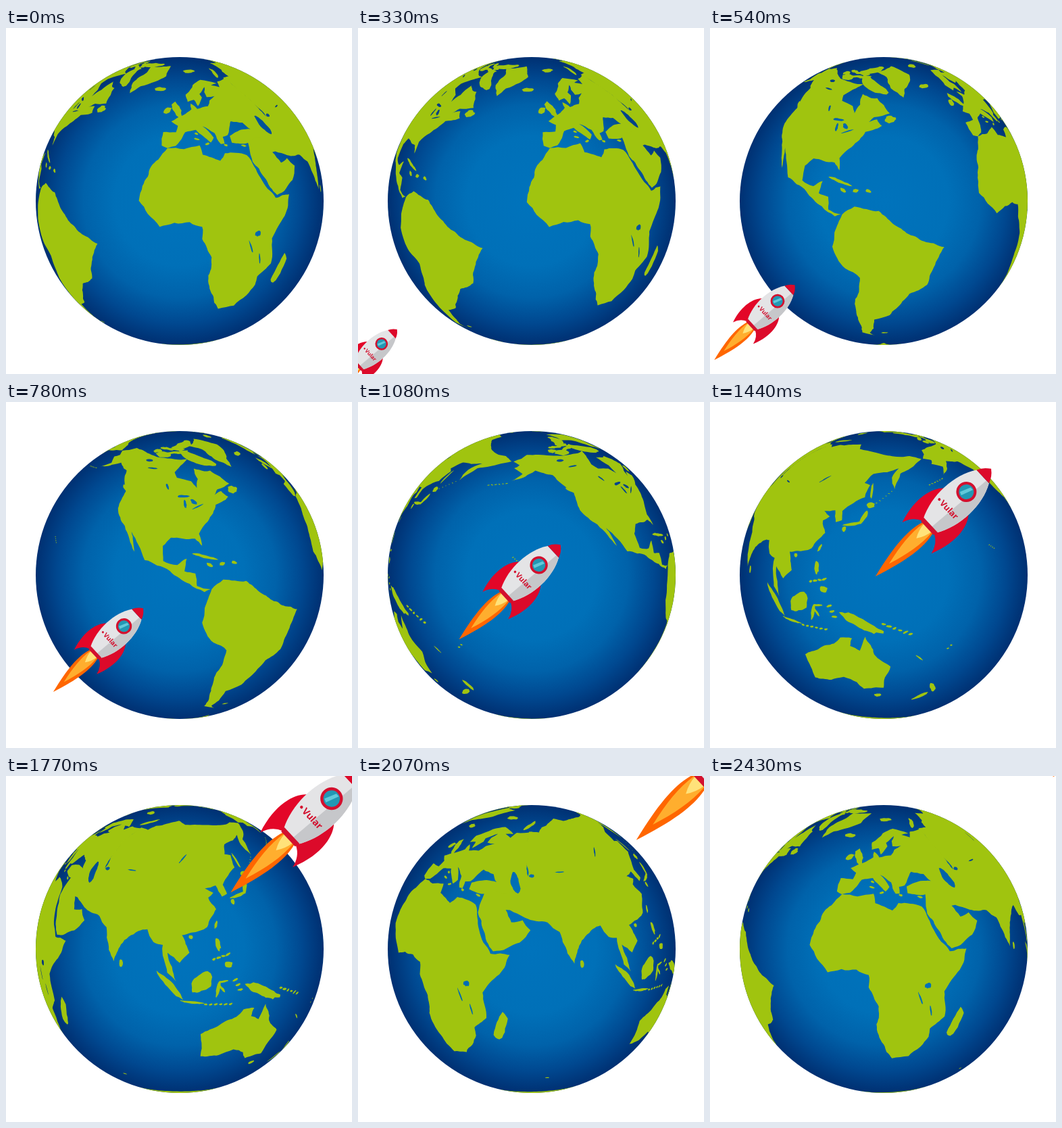
Animation of 512 by 512 pixels, one loop 2.53 s. Source, as an HTML page with a canvas:

```html
<!DOCTYPE html>
<html lang="en">
<head>
<meta charset="utf-8">
<title>Rocket around the globe</title>
<style>
  html, body { margin: 0; width: 100%; height: 100%; overflow: hidden; background: #fff; }
  canvas { display: block; width: 512px; height: 512px; }
</style>
</head>
<body>
<canvas id="stage" width="512" height="512"></canvas>
<script>
const ctx = document.getElementById('stage').getContext('2d');
const LOOP = 2530, STEP = 30, RAD = Math.PI / 180;
const CX = 257, CY = 256, R = 213, TILT = 14.5 * RAD;
const GREEN = '#a0c40f', RED = '#d3102e';
const lands = [], lakes = [];

let seed = 7;
function random() {
  seed = (seed * 16807) % 2147483647;
  return seed / 2147483647;
}

// Splits an edge by midpoint displacement, which gives a ragged shore.
function roughen([x0, y0], [x1, y1], out) {
  const mx = (x0 + x1) / 2, my = (y0 + y1) / 2, cos = Math.cos(my * RAD);
  const dx = (x1 - x0) * cos, dy = y1 - y0;
  if (Math.hypot(dx, dy) < 1.8) return out.push([x0, y0]);
  const shift = (random() - .5) * .14;
  const mid = [mx - dy * shift / cos, my + dx * shift];
  roughen([x0, y0], mid, out);
  roughen(mid, [x1, y1], out);
}

function addShape(list, corners) {
  const out = [];
  corners.forEach((p, i) => roughen(p, corners[(i + 1) % corners.length], out));
  list.push(out.map(([lon, lat]) =>
    ({ lon: lon * RAD, s: Math.sin(lat * RAD), c: Math.cos(lat * RAD) })));
}

// Closed shore through lon, lat pairs
function coast(...c) {
  addShape(lands, Array.from({ length: c.length / 2 }, (_, i) => [c[2 * i], c[2 * i + 1]]));
}

// Uneven ellipse: half length a, half width b, turned by rot degrees from east
function blob(list, lon, lat, a, b, rot = 0) {
  const cr = Math.cos(rot * RAD), sr = Math.sin(rot * RAD), n = 14;
  addShape(list, Array.from({ length: n }, (_, i) => {
    const w = i / n * 2 * Math.PI, k = .85 + .35 * random();
    const x = a * k * Math.cos(w), y = b * k * Math.sin(w);
    return [lon + (x * cr - y * sr) / Math.cos(lat * RAD), lat + x * sr + y * cr];
  }));
}
const isle = (...p) => blob(lands, ...p);
const lake = (...p) => blob(lakes, ...p);

function chain(x0, y0, x1, y1, n, size) {
  for (let i = 0; i < n; i++) {
    const k = i / (n - 1);
    isle(x0 + (x1 - x0) * k, y0 + (y1 - y0) * k, size * (.8 + .6 * random()), size * .5, 60 * random() - 30);
  }
}

// Africa
coast(-6,36, 10,37, 11,33, 19,30, 22,33, 33,31, 37,21, 43,12, 51,12, 47,4, 40,-4, 41,-15, 35,-20, 35,-24,
  32,-29, 27,-34, 19,-35, 15,-27, 12,-17, 13,-9, 9,-1, 9,4, 4,6, -8,4, -13,9, -17,14, -16,20, -13,28, -10,31);
// Europe and Anatolia
coast(-6,36, -9,37, -9,43, -2,43, -1,46, -5,48, 2,51, 8,54, 8,57, 12,54, 20,55, 23,58, 29,60, 22,60, 22,63,
  25,66, 17,62, 18,60, 13,55.5, 11,59, 6,58, 5,62, 14,68, 26,71, 41,67, 33,66.5, 40,64.5, 44,68, 60,69,
  60,36, 36,36, 27,37, 27,40, 30,41, 35,42, 41,41.5, 38,45, 31,46.5, 28,43, 26,40.5, 23,40, 23,37, 21,37,
  19,42, 13,45.5, 18,40, 16,38, 9,44, 3,43, 0,39, -2,37);
// Asia
coast(35,31, 35,28, 39,21, 44,13, 55,17, 59.5,22, 56,26, 51,25, 48,30, 50,30, 57,27, 67,25, 72,21, 73,17,
  77.5,8, 80,15, 87,21, 91,22, 94,17, 98,16, 100,5, 103.5,1.5, 100,13, 105,9, 109,13, 106,20, 110,21, 117,23,
  122,30, 119,35, 122,37, 118,39, 124,40, 126,35, 129,36, 128,40, 139,47, 141,53, 137,54, 142,59, 163,62,
  156,57, 157,51, 163,59, 178,63, 190,66, 180,69, 160,70, 140,72.5, 113,74, 104,77.5, 80,73, 73,72, 68,68.5,
  57,69, 57,39, 36,37);
// North America
coast(-168,66, -156,71, -128,70, -95,68, -82,68, -87,65, -94,60, -92,57, -82,55, -79,51.5, -77,56, -78,62,
  -70,60, -65,60, -56,52, -66,50, -70,47, -64,49, -61,46, -66,44, -70,43, -76,36, -81,31, -80,26, -83,29,
  -94,29.5, -97.5,26, -97,20, -91,18.5, -87,21, -88,16, -83.5,15, -83,10, -77.5,8.5, -80,7.5, -86,11, -94,16,
  -105,20, -113,31, -110,23, -117,33, -124,40, -124,48, -134,58, -147,61, -152,59, -164,55, -157,59,
  -165,62, -161,64);
// South America
coast(-77,8.5, -72,12, -62,10.5, -50,1, -35,-5.5, -39,-14, -41,-22, -48.5,-26, -54,-34, -57,-38, -65,-41,
  -66,-48, -69,-52, -65.5,-55, -74,-52, -73.5,-40, -70,-18, -76,-14, -81,-5, -80,1);
// Australia
coast(142.5,-11, 146,-19, 153,-25, 150,-37, 140,-38, 137,-34, 131,-31.5, 124,-34, 115,-34, 114,-22, 122,-18,
  129,-15, 132,-12, 137,-12, 136,-15.5, 140,-17.5);
// Greenland
coast(-73,78, -33,83.5, -20,74, -40,65, -44,60, -53,66, -56,74);
// Antarctica: a wavy ring with one peninsula
addShape(lands, Array.from({ length: 72 }, (_, i) => {
  const lon = i * 5 - 180;
  return [lon, -71 + 4 * Math.cos((lon - 100) * RAD) + 9 * Math.exp(-(((lon + 60) / 6) ** 2))];
}).concat([[180, -85], [-180, -85]]));

// Northern islands
isle(-73, 68, 8, 2.6, -45);
isle(-80, 79.5, 5, 2.4, 45);
isle(-110, 71, 3, 2);
isle(-121, 73, 1.7, 1.4);
chain(-115, 75.5, -88, 75.3, 5, 1.6);
chain(-100, 72.5, -86, 73, 3, 1.8);
isle(-56, 49, 2.2, 1.7);
isle(-18.5, 65, 2.4, 1.2);
isle(-2, 54, 4.2, 1.4, 110);
isle(-8, 53.3, 1.8, 1.2, 60);
isle(18, 78.5, 2.2, 1.4);
isle(58, 73.5, 4.5, .8, 55);
// Mediterranean, Caribbean and Atlantic
chain(9, 42.2, 9, 39.8, 2, .9);
chain(14, 37.5, 33, 35.1, 3, .9);
isle(-79.5, 21.7, 5, .6, -17);
chain(-77.3, 18.2, -66.5, 18.4, 3, 1.3);
isle(-59.5, -51.7, 1.3, .5);
// Indian Ocean and Indonesia
isle(46.8, -18.7, 6.8, 2, 72);
isle(80.7, 7.6, 1.4, .8, 90);
isle(69.5, -49.2, .8, .4);
isle(101, -.2, 7, 1.2, -48);
isle(110, -7.3, 4.4, .5, -8);
isle(114, .9, 4.8, 3.3, 45);
isle(120.5, -2.2, 3.2, .7, 80);
isle(122.7, .8, 2.2, .4, 5);
isle(122, -2, 2, .5, -50);
chain(115.5, -8.4, 126, -9, 6, .8);
chain(127.8, 1, 130, -3.3, 3, .9);
isle(141, -5.4, 9, 2, -25);
chain(150, -5.5, 161, -10, 6, .9);
// Pacific
isle(121, 16, 2.6, 1, 100);
isle(125, 7.5, 1.7, 1.3);
chain(119, 10, 125, 11.5, 4, .9);
isle(121, 23.7, 1.5, .5, 70);
isle(109.7, 19.2, .9, .8);
isle(134.8, 34.8, 3.6, .7, 12);
isle(140, 38, 3.2, .9, 65);
isle(130.9, 32.5, 1.2, .8, 90);
isle(142.8, 43.4, 1.6, 1.3);
isle(142.7, 50, 3.8, .5, 90);
chain(146, 44.5, 155, 50, 6, .3);
chain(-167, 53.5, -179, 51.7, 6, .4);
chain(-158, 21.4, -155.5, 19.5, 4, .35);
isle(-126, 49.7, 2, .5, -40);
isle(165.5, -21.2, 2, .3, -42);
chain(178, -18, 179.3, -16.7, 2, .6);
isle(146.8, -42, 1.4, 1.1);
isle(175.8, -38.6, 3, 1.1, -60);
isle(170.5, -43.8, 3.8, 1.1, 40);

// Inland waters
lake(51, 42, 4.6, 1.6, 108);
lake(60, 45, 1, .8);
lake(76.5, 46.3, 1.8, .25);
lake(107.3, 53.5, 2.6, .3, 55);
lake(33, -1, 1.3, 1.1);
lake(29.9, -6, 2.6, .3, 110);
lake(34.6, -11.8, 2.3, .3, 100);
lake(-88, 47.6, 2.5, .6);
lake(-87, 44, 1.8, .5, 95);
lake(-82, 44.8, 1.5, .8, -45);
lake(-80, 42.7, 2.4, .3, 25);
lake(-98, 52.3, 1.6, .4, 110);
lake(-113, 61.6, 2, .4);
lake(-121, 66, 1.4, .8);

const ocean = ctx.createRadialGradient(CX, CY, 0, CX, CY, R);
[[0, '#0073bc'], [.45, '#0070b8'], [.67, '#0062aa'], [.85, '#004890'], [1, '#003072']]
  .forEach(([at, color]) => ocean.addColorStop(at, color));

const sinT = Math.sin(TILT), cosT = Math.cos(TILT);

// Points behind the horizon slide out past the rim, where the disc clip hides them.
function trace(pts, lon0) {
  let visible = false;
  ctx.beginPath();
  for (const p of pts) {
    const d = p.lon - lon0, cd = Math.cos(d);
    let x = p.c * Math.sin(d), y = cosT * p.s - sinT * p.c * cd;
    if (sinT * p.s + cosT * p.c * cd > 0) visible = true;
    else {
      const k = 1.02 / (Math.hypot(x, y) || 1);
      x *= k; y *= k;
    }
    ctx.lineTo(CX + R * x, CY - R * y);
  }
  ctx.closePath();
  if (visible) ctx.fill();
}

function drawGlobe(lon) {
  ctx.save();
  ctx.beginPath();
  ctx.arc(CX, CY, R, 0, 2 * Math.PI);
  ctx.fillStyle = ocean;
  ctx.fill();
  ctx.clip();
  ctx.fillStyle = GREEN;
  lands.forEach(p => trace(p, lon * RAD));
  ctx.fillStyle = ocean;
  lakes.forEach(p => trace(p, lon * RAD));
  ctx.restore();
}

// Rocket parts, nose tip at 0,0 and pointing up
const rocket = [
  ['#ff6600', 'M-11 128C-18 152-14 184 0 233.5C14 184 18 152 11 128Z'],
  ['#ffae2e', 'M-9 128C-12 152-8 176 0 206C8 176 12 152 9 128Z'],
  ['#ffe27a', 'M-8 128Q-7 140 0 151Q7 140 8 128Z'],
  ['#e30628', 'M-26 70C-37 80-47 108-31.5 150Q-27 133-13 127Z'],
  ['#dc0a2a', 'M26 70C37 80 47 108 31.5 150Q27 133 13 127Z'],
  ['#e4e4e6', 'M-13.5 17C-31 45-32 92-14 124H14C32 92 31 45 13.5 17Z'],
  ['#c6c7ca', 'M8 17H13.5C31 45 32 92 14 124H3Z'],
  ['#dc0a2a', 'M0 0Q-10 7-13.5 17H13.5Q10 7 0 0Z'],
  [RED, 'M-15 122H15L13.5 129H-13.5Z'],
  [RED, 'M-15 50a15 15 0 1 0 30 0a15 15 0 1 0-30 0Z'],
  ['#2298b4', 'M-11 50a11 11 0 1 0 22 0a11 11 0 1 0-22 0Z'],
  ['#62c9da', 'M-6.5 57L-.5 41H4.5L-1.5 59Z'],
  [RED, 'M-21 87a2 2 0 1 0 4 0a2 2 0 1 0-4 0Z']
].map(([color, d]) => [color, new Path2D(d)]);

function drawRocket(t) {
  const d = t - 780, k = .778 + .000338 * d;
  ctx.save();
  ctx.translate(203 + .3228 * d, 305.3 - .3128 * d);
  ctx.rotate(47.1 * RAD);
  ctx.scale(k, k);
  for (const [color, path] of rocket) {
    ctx.fillStyle = color;
    ctx.fill(path);
  }
  ctx.fillStyle = RED;
  ctx.font = 'bold 12.5px "Open Sans", sans-serif';
  ctx.textAlign = 'center';
  ctx.fillText('Vular', 2, 91);
  ctx.restore();
}

// The globe turns in hard 15 degree steps, a little slower near the end.
function turn(t) {
  const n = t < 1440 ? (t - 180) / 90 : 14 + (t - 1440) / 105;
  return -15 * Math.max(0, Math.min(23, Math.floor(n)));
}

const start = performance.now();
function frame(now) {
  const raw = Math.max(0, now - start) % LOOP;
  const t = raw < 180 ? 0 : Math.min(2430, Math.floor(raw / STEP) * STEP);
  ctx.fillStyle = '#fff';
  ctx.fillRect(0, 0, 512, 512);
  drawGlobe(turn(t));
  drawRocket(t);
  requestAnimationFrame(frame);
}
frame(start);
</script>
</body>
</html>
```
